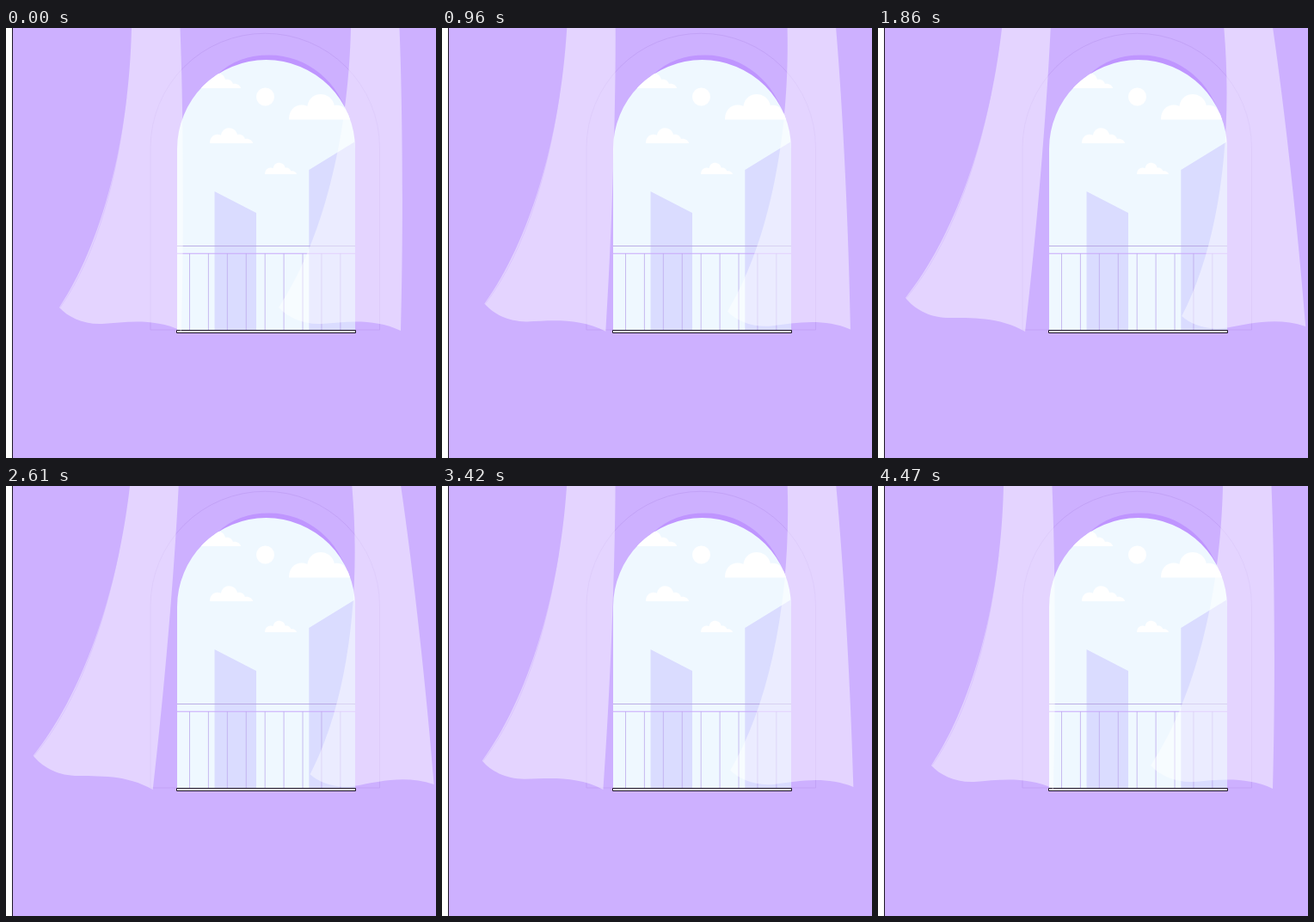
These frames come from a looping animation (500x500 px, 4590 ms). An HTML page:

```html
<!DOCTYPE html>
<html lang="en">
<head>
<meta charset="utf-8">
<title>Curtains in the breeze</title>
<style>
  html, body { margin: 0; height: 100%; overflow: hidden; background: #fff; }
  svg { display: block; width: 100vw; height: 100vh; }
</style>
</head>
<body>
<svg viewBox="0 0 500 500">
  <defs>
    <path id="opening" d="M199 351.5V140.5A103.5 103.5 0 0 1 406 140.5V351.5Z"/>
    <clipPath id="window"><use href="#opening"/></clipPath>
    <path id="cloud" fill="#fff" d="M0 0C0-8 6-12 13-9.5C15-21 30-20 32-10C37-11 40-8 41-5C45-6 50-3 50 0Z"/>
    <path id="curtain" fill="#fff" fill-opacity=".45" d="M147-40L146 0C143 130 112 250 62 325C72 336 90 345 112 344C140 342 172 337 204 352C207 240 206.5 100 202.5 0L200-40Z"/>
  </defs>

  <!-- wall -->
  <path fill="#cdb0ff" d="M8 0H500V500H8Z"/>
  <path fill="#1c1326" d="M7 0H8V500H7Z"/>
  <path fill="none" stroke="#bd9df2" stroke-width=".7" d="M168 351V139.5A133.25 133.25 0 0 1 434.5 139.5V351Z"/>

  <!-- view -->
  <path fill="#bf95ff" d="M247 53Q270 31.5 306 31.5C350 31.5 388 62 400 110Z"/>
  <use href="#opening" fill="#eff8ff"/>
  <g clip-path="url(#window)">
    <circle cx="301.5" cy="80" r="10.5" fill="#fff"/>
    <use href="#cloud" x="223" y="70"/>
    <use href="#cloud" x="237" y="134"/>
    <use href="#cloud" transform="translate(301 170) scale(.74)"/>
    <use href="#cloud" transform="translate(329 106.5) scale(1.65)"/>
    <path fill="#dadcff" d="M242.5 190L291 215V352H242.5ZM352.3 165L406 132V352H352.3Z"/>
  </g>

  <!-- railing and sill -->
  <path stroke="#b5a5e2" stroke-width=".9" d="M199 253.5H406"/>
  <path stroke="#c8a8fb" stroke-width="1.1" d="M199 262.2H406"/>
  <path id="bars" stroke="#bdaaec" stroke-width=".8"/>
  <path fill="#fff" stroke="#1c1326" d="M198.5 351.5H406.5V354.5H198.5Z"/>

  <g id="left">
    <use href="#curtain"/>
    <path fill="none" stroke="#cdb0ff" stroke-width=".6" stroke-opacity=".7" d="M140 80C130 170 108 260 63 325"/>
  </g>
  <g id="right"><use href="#curtain" x="255"/></g>
</svg>
<script>
const LOOP = 4590, SWAY = 4500;
const find = id => document.getElementById(id);
const rotate = (id, angle, x, y) =>
  find(id).setAttribute('transform', `rotate(${angle} ${x} ${y})`);

find('bars').setAttribute('d',
  Array.from({ length: 9 }, (_, i) => `M${213.5 + i * 21.92} 262V351`).join(''));

function draw(now) {
  const t = Math.min(now % LOOP, SWAY);
  const sway = (1 - Math.cos(2 * Math.PI * t / SWAY)) / 2;
  rotate('left', 5.45 * sway, 175, -20);
  rotate('right', -6.5 * sway, 431, -13);
}

let start;
requestAnimationFrame(function tick(now) {
  start ??= now;
  draw(now - start);
  requestAnimationFrame(tick);
});
</script>
</body>
</html>
```
